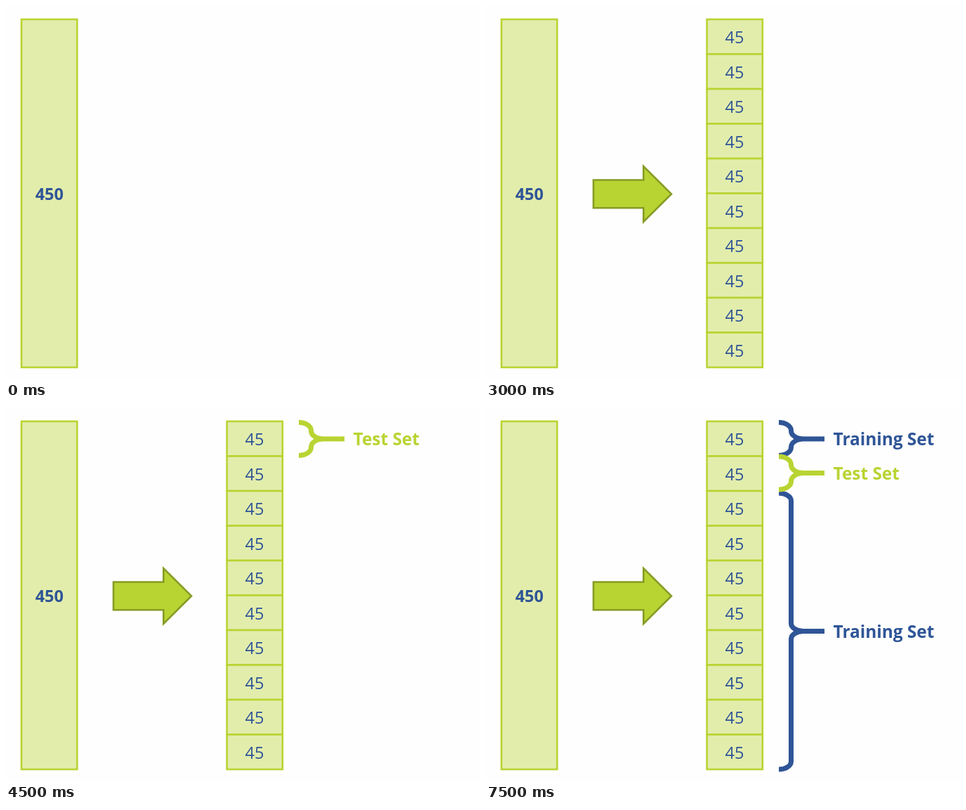
Animation of 675x532 px, one loop 8000 ms. Source, as an HTML page:

```html
<!DOCTYPE html>
<html lang="en">
<head>
<meta charset="utf-8">
<style>
html, body { margin: 0; width: 100%; height: 100%; overflow: hidden; background: #fefefe; }
svg { display: block; width: 100vw; height: 100vh; }
text { font-family: "Open Sans", "Noto Sans", sans-serif; fill: #2f5597; }
.num { font-size: 23.5px; text-anchor: middle; }
.bold { font-weight: 700; }
.label { font-size: 24.4px; font-weight: 700; }
.bar { fill: #e2edac; stroke: #b8d432; stroke-width: 2.6; }
.brace { fill: none; stroke-width: 7; }
</style>
</head>
<body>
<svg id="stage" viewBox="0 0 675 532"></svg>
<script>
const GREEN = '#b8d432', BLUE = '#2f5597';
const LOOP = 8000, STEP = 1500;
const stage = document.getElementById('stage');

function add(parent, tag, attrs, text) {
  const el = document.createElementNS('http://www.w3.org/2000/svg', tag);
  for (const key in attrs) el.setAttribute(key, attrs[key]);
  if (text) el.textContent = text;
  parent.appendChild(el);
  return el;
}

// Each group is visible from step `from` up to, but not including, step `to`.
const groups = [];
function group(from, to = Infinity) {
  const el = add(stage, 'g', {});
  groups.push({ el, from, to });
  return el;
}

// Right-hand brace with a straight pointer and a label.
function brace(parent, top, bottom, rx, ry, color, name) {
  const mid = (top + bottom) / 2, x = 417, spine = x + 17.5, tip = spine + 17.5;
  add(parent, 'path', {
    class: 'brace', stroke: color,
    d: `M${x} ${top}A${rx} ${ry} 0 0 1 ${spine} ${top + ry}V${mid - ry}` +
       `A${rx} ${ry} 0 0 0 ${tip} ${mid}A${rx} ${ry} 0 0 0 ${spine} ${mid + ry}` +
       `V${bottom - ry}A${rx} ${ry} 0 0 1 ${x} ${bottom}M${tip - 4} ${mid}H482`
  });
  add(parent, 'text', { class: 'label', x: 494.5, y: mid + 9, style: `fill:${color}` }, name);
}
const small = (parent, top, color, name) => brace(parent, top, top + 47, 17.5, 11.5, color, name);
const large = (parent, top, bottom) => brace(parent, top, bottom, 17.5, 11, BLUE, 'Training Set');

const whole = group(0);
add(whole, 'rect', { class: 'bar', x: 22, y: 19, width: 79.3, height: 495 });
add(whole, 'text', { class: 'num bold', x: 61.8, y: 276 }, '450');

add(group(1), 'path', {
  d: 'M153 247.5H224.3V228L264 267.4L224.3 306.8V287.2H153Z',
  fill: GREEN, stroke: '#869b24', 'stroke-width': 2.6
});

const parts = group(2);
for (let i = 0; i < 10; i++) {
  const y = 19 + i * 49.5;
  add(parts, 'rect', { class: 'bar', x: 314.6, y, width: 79.2, height: 49.5 });
  add(parts, 'text', { class: 'num', x: 354, y: y + 34 }, '45');
}

const rest = group(4, 5);
large(rest, 69, 514);
small(group(3, 5), 20.5, GREEN, 'Test Set');

const second = group(5);
small(second, 20.5, BLUE, 'Training Set');
large(second, 121, 514);
small(second, 69, GREEN, 'Test Set');

function draw(time) {
  const step = Math.floor((time % LOOP) / STEP);
  for (const { el, from, to } of groups) {
    el.setAttribute('visibility', step >= from && step < to ? 'visible' : 'hidden');
  }
}

const start = performance.now();
function tick() {
  draw(performance.now() - start);
  requestAnimationFrame(tick);
}
draw(0);
requestAnimationFrame(tick);
</script>
</body>
</html>
```
